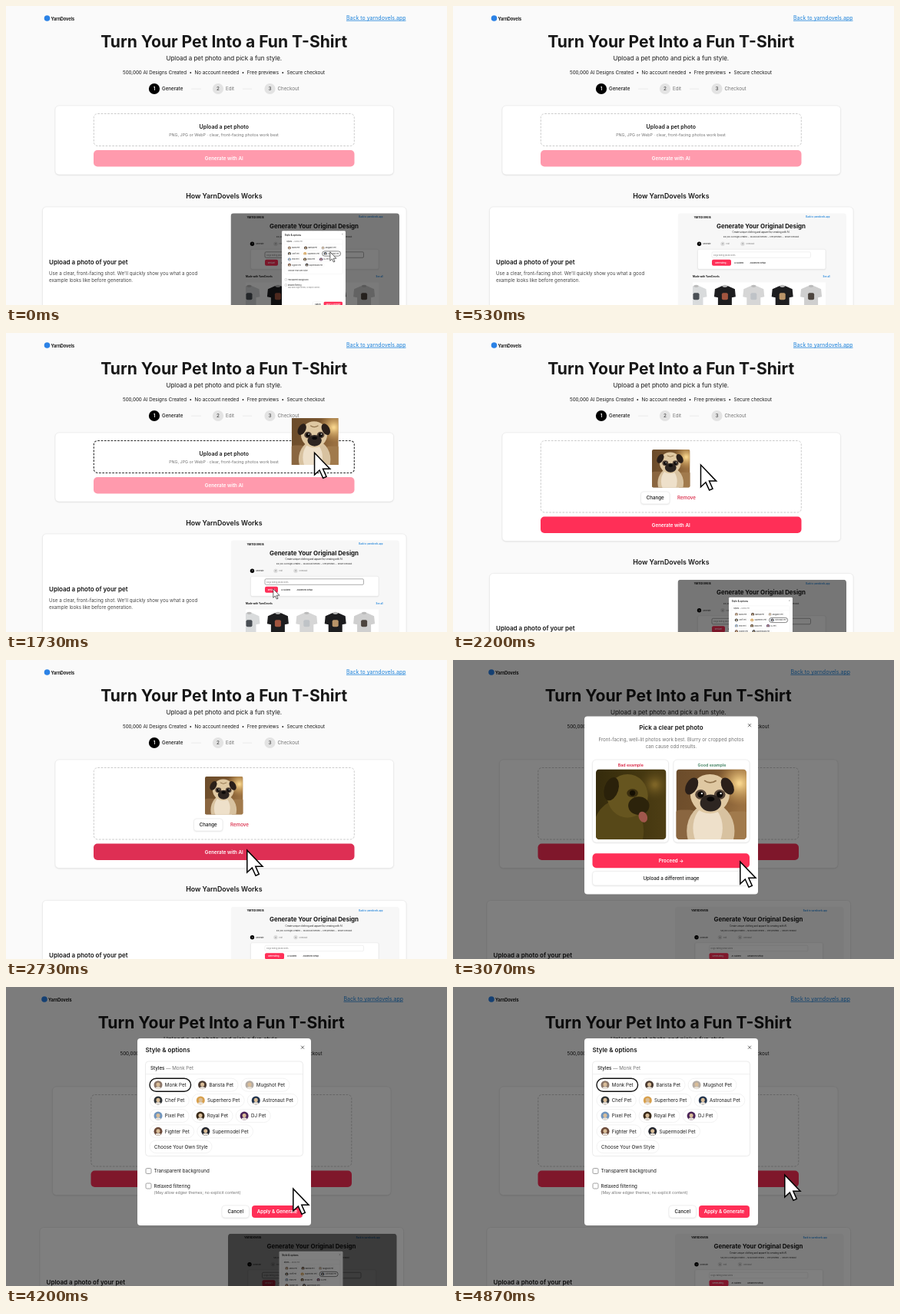
Recreate the animation shown at these times as an HTML page with a canvas. Size 574 by 390 pixels, loop 4.94 s.

```html
<!DOCTYPE html>
<html lang="en">
<head>
<meta charset="utf-8">
<title>Pet T-shirt walkthrough</title>
<style>
  html, body { margin: 0; width: 100%; height: 100%; overflow: hidden; background: #fafafa; }
  canvas { display: block; width: 574px; height: 390px; }
</style>
</head>
<body>
<canvas id="stage"></canvas>
<script>
const W = 574, H = 390, LOOP = 4940;
const DROP = 2050, DIALOG = 2870, PRESS = 3550, OPTIONS = 3850;
const RED = '#ff2f57', HOVER = '#de2f54', INK = '#171717', GRAY = '#737373', LINE = '#e6e6e6', BLUE = '#1c82da';
const BRAND = 'YarnDovels';
const STATS = '500,000 AI Designs Created  •  No account needed  •  Free previews  •  Secure checkout';

const canvas = document.getElementById('stage');
const ctx = canvas.getContext('2d');
const dpr = window.devicePixelRatio || 1;
canvas.width = W * dpr;
canvas.height = H * dpr;

// ---------- helpers ----------

const clamp = v => Math.max(0, Math.min(1, v));

function text(s, x, y, size, { color = INK, weight = 400, align = 'left' } = {}) {
  ctx.font = `${weight} ${size}px Inter, sans-serif`;
  ctx.fillStyle = color;
  ctx.textAlign = align;
  ctx.fillText(s, x, y + size * 0.36);
  return ctx.measureText(s).width;
}
const centered = (s, x, y, size, color, weight) => text(s, x, y, size, { color, weight, align: 'center' });

function box(x, y, w, h, r, fill, stroke, line = 0.8) {
  ctx.beginPath();
  ctx.roundRect(x, y, w, h, r);
  paint(fill, stroke, line);
}

function paint(fill, stroke, line = 0.8) {
  if (fill) { ctx.fillStyle = fill; ctx.fill(); }
  if (stroke) { ctx.strokeStyle = stroke; ctx.lineWidth = line; ctx.stroke(); }
}

function oval(x, y, rx, ry, fill, angle = 0, stroke, line) {
  ctx.beginPath();
  ctx.ellipse(x, y, rx, ry, angle, 0, 7);
  paint(fill, stroke, line);
}

function poly(points, fill, stroke, line) {
  ctx.beginPath();
  points.forEach(([x, y]) => ctx.lineTo(x, y));
  ctx.closePath();
  paint(fill, stroke, line);
}

function dashed(x, y, w, h, r, color, line, dash) {
  ctx.setLineDash(dash);
  box(x, y, w, h, r, null, color, line);
  ctx.setLineDash([]);
}

function card(x, y, w, h, r = 5) {
  ctx.save();
  ctx.shadowColor = 'rgba(0,0,0,.12)';
  ctx.shadowBlur = 2 * dpr;
  ctx.shadowOffsetY = 0.7 * dpr;
  box(x, y, w, h, r, '#fff');
  ctx.restore();
  box(x, y, w, h, r, null, LINE, 0.6);
}

function at(x, y, scale, draw) {
  ctx.save();
  ctx.translate(x, y);
  ctx.scale(scale, scale);
  draw();
  ctx.restore();
}

// Keys are [time, x, y, linear?]; the flag belongs to the stretch ending at that key.
function along(keys, t) {
  const i = keys.findIndex(k => k[0] > t);
  if (i < 0) return keys[keys.length - 1].slice(1, 3);
  if (i === 0) return keys[0].slice(1, 3);
  const [t0, x0, y0] = keys[i - 1], [t1, x1, y1, linear] = keys[i];
  const u = (t - t0) / (t1 - t0), e = linear ? u : u * u * (3 - 2 * u);
  return [x0 + (x1 - x0) * e, y0 + (y1 - y0) * e];
}

function arrow(x, y, scale = 1) {
  at(x, y, scale, () => {
    ctx.lineJoin = 'miter';
    poly([[0.8, 1.2], [0.8, 30], [7.3, 24], [12, 34.2], [16.3, 32.4], [11.8, 22.3], [21, 22.3]], '#fff', '#000', 1.5);
  });
}

// ---------- pictures ----------

function picture(x, y, size, r, draw) {
  at(x, y, size / 100, () => {
    ctx.beginPath();
    ctx.roundRect(0, 0, 100, 100, r);
    ctx.clip();
    draw();
  });
}

function fillGradient(gradient, ...colors) {
  colors.forEach((c, i) => gradient.addColorStop(i / (colors.length - 1), c));
  ctx.fillStyle = gradient;
  ctx.fillRect(0, 0, 100, 100);
}

function pug(x, y, size, r = 0) {
  picture(x, y, size, r, () => {
    fillGradient(ctx.createLinearGradient(0, 0, 100, 30), '#6b4c2b', '#75522d', '#9a7041');
    fillGradient(ctx.createRadialGradient(90, 20, 2, 90, 20, 32), '#f6d48c', 'rgba(200,150,80,0)');
    box(-4, 58, 34, 46, 10, '#8a6640');
    box(70, 60, 36, 46, 10, '#a17a4c');
    oval(49, 88, 34, 40, '#d8c2a0');
    oval(45, 84, 21, 32, '#eee0ca');
    oval(48, 35, 28, 28, '#dfc8a2');
    oval(22, 24, 8, 13, '#2a1f19', 0.5);
    oval(73, 24, 8, 13, '#2a1f19', -0.5);
    oval(35, 36, 8, 7, '#57463a');
    oval(62, 36, 8, 7, '#57463a');
    oval(49, 48, 15, 12, '#2d2521');
    oval(35, 36, 4.6, 4.6, '#0c0908');
    oval(62, 36, 4.6, 4.6, '#0c0908');
    oval(36.5, 34.5, 1.3, 1.3, '#fff');
    oval(63.5, 34.5, 1.3, 1.3, '#fff');
    oval(49, 42.5, 5.5, 3.4, '#0a0808');
    ctx.beginPath();
    ctx.moveTo(40, 16); ctx.quadraticCurveTo(48, 22, 57, 16);
    paint(null, '#93764f', 2);
  });
}

function badPug(x, y, size) {
  picture(x, y, size, 5, () => {
    fillGradient(ctx.createLinearGradient(0, 0, 100, 0), '#352b0c', '#41350f', '#4e3e14');
    fillGradient(ctx.createRadialGradient(84, 22, 2, 84, 22, 24), '#7d6426', 'rgba(78,62,20,0)');
    oval(32, 88, 36, 44, '#574818');
    oval(45, 38, 29, 31, '#66551f');
    oval(22, 28, 10, 17, '#2a210a', 0.3);
    oval(61, 52, 15, 13, '#2c230b');
    oval(52, 34, 8, 6, '#3a2e0f');
    oval(52, 34, 4, 4, '#151003');
    oval(67, 68, 6, 8, '#a0574c', -0.4);
  });
}

function cartoonDog(x, y, fur, floppy) {
  const edge = '#4b2a20';
  at(x, y, 1, () => {
    ctx.lineJoin = 'round';
    for (const side of [-1, 1]) {
      if (floppy) oval(side * 16, 0, 6, 13, '#b98154', -side * 0.3, edge, 1.3);
      else poly([[side * 17, -4], [side * 15, -23], [side * 4, -14]], fur, edge, 1.3);
    }
    oval(0, 20, 15, 14, fur, 0, edge, 1.3);
    oval(0, 0, floppy ? 16 : 18, 16.5, fur, 0, edge, 1.3);
    oval(0, 6, 11, 8.5, '#fff0da');
    for (const side of [-1, 1]) {
      oval(side * 7, -2, 2.2, 2.7, '#2a1713');
      oval(side * 7 + 0.6, -3, 0.7, 0.7, '#fff');
      oval(side * 11, 5, 2.4, 1.5, '#f2a08a');
      oval(side * 8, 16, 4, 3.5, fur, 0, edge, 1);
    }
    oval(0, 3, 2.4, 1.7, '#2a1713');
    oval(0, 9, 4, 2.6, '#a33d35', 0, edge, 0.8);
    oval(0, 15, 6, 3.5, '#8a5030', 0, edge, 1);
  });
}

function shirt(x, y, color, print) {
  at(x, y, 1, () => {
    poly([[-4, 0], [4, 0], [13, 4], [14, 14], [9, 15], [9, 40], [-9, 40], [-9, 15], [-14, 14], [-13, 4]], color);
    oval(0, 0, 3.2, 1.6, '#bbb');
    box(-4, 9, 8, 9, 2, print);
  });
}

// ---------- embedded demo clip ----------

const DEMO_LOOP = 2000;
const demoArrow = [[0, 55, 63], [100, 55, 63], [240, 129, 50], [350, 129, 50], [560, 135, 118], [1900, 80, 110], [DEMO_LOOP, 55, 63]];
const SHIRTS = [['#d9dbdc', '#4a4f55'], ['#1d1d1f', '#a2553f'], ['#d6d6d6', '#bfc3c7'], ['#1d1d1f', '#b99468'], ['#cfcfcf', '#4d453f']];

function demoShirts() {
  text('Made with ' + BRAND, 19.5, 83, 3.2, { weight: 700 });
  text('See all', 198, 83, 2.8, { color: BLUE, weight: 600, align: 'right' });
  ctx.save();
  ctx.beginPath();
  ctx.rect(19.5, 90, 173, 60);
  ctx.clip();
  ctx.fillStyle = '#fff';
  ctx.fillRect(19.5, 90, 173, 60);
  SHIRTS.forEach(([color, print], i) => shirt(24 + i * 37.4, 95, color, print));
  ctx.restore();
}

function demo(x, y, p) {
  const choosing = p >= 100 && p < 620;
  const generating = p >= 620 && p < 1420;
  const results = p >= 1420 && p < 1880;
  at(x, y, 1, () => {
    ctx.beginPath();
    ctx.roundRect(0, 0, 219.5, 150, 4);
    ctx.clip();
    ctx.fillStyle = '#f7f7f7';
    ctx.fillRect(0, 0, 220, 150);
    text(BRAND, 21, 5, 4, { weight: 700 });
    text('Back to yarndovels.app', 198, 5, 2.75, { color: BLUE, weight: 600, align: 'right' });
    centered('Generate Your Original Design', 108.5, 16.5, 7.9, INK, 700);
    centered('Create unique clothing and apparel by creating with AI.', 108.5, 25, 2.9, INK);
    centered(STATS, 108.5, 31, 2.35, INK);
    [['Generate', 28], ['Edit', 58.5], ['Checkout', 84.5]].forEach(([label, cx], i) => {
      oval(cx, 40, 2.7, 2.7, i ? '#ddd' : '#000');
      centered(String(i + 1), cx, 40, 2.4, i ? GRAY : '#fff', 600);
      text(label, cx + 4.5, 40, 2.4, { color: i ? GRAY : INK });
    });
    card(26, 47, 166.5, results ? 110 : 26, 2);
    box(44.5, 50.5, 128.5, 7.5, 1.5, '#fff', results || generating ? LINE : '#777', 0.6);
    text('Dogs eating pizza slices', 46.5, 54.3, 2.5, { color: GRAY });
    const wide = generating ? 25 : 17;
    box(44.5, 60.5, wide, 8, 2, RED);
    centered(generating ? 'Generating…' : 'Restart', 44.5 + wide / 2, 64.5, 2.7, '#fff', 600);
    text('AI Guided', 48.5 + wide, 64.5, 2.6, { weight: 500 });
    text('Advanced Setup', 69 + wide, 64.5, 2.6, { weight: 500 });
    if (results) {
      cartoonDog(55, 103, '#d98a4a');
      cartoonDog(108, 101, '#edc79b', true);
      cartoonDog(161, 103, '#d98a4a');
    } else {
      demoShirts();
    }
    if (choosing) {
      ctx.fillStyle = 'rgba(0,0,0,.52)';
      ctx.fillRect(0, 0, 220, 150);
      at(66.5, 23, 0.367, () => optionsDialog(5, 34));
    }
    if (p < 620 || p > 1940) arrow(...along(demoArrow, p), 0.4);
  });
}

// ---------- page ----------

function page(t) {
  const uploaded = t >= DROP, push = uploaded ? 51.5 : 0;
  const over = !uploaded && t > 1000 && along(arrowPath, t)[0] < 453;
  const hovered = t > 2500 && t < DIALOG;

  oval(53.5, 16, 3.8, 3.8, '#2b82e6');
  text(BRAND, 58.5, 17.3, 5.5, { weight: 700 });
  const linkWidth = text('Back to yarndovels.app', 520.5, 15.7, 7, { color: BLUE, align: 'right' });
  ctx.fillRect(520.5 - linkWidth, 18.7, linkWidth, 0.8);
  centered('Turn Your Pet Into a Fun T-Shirt', 283.8, 46.5, 21.1, INK, 700);
  centered('Upload a pet photo and pick a fun style.', 283.8, 68.5, 8, INK);
  centered(STATS, 283.5, 86.3, 6.22, INK);

  [['Generate', 193], ['Edit', 276], ['Checkout', 343.5]].forEach(([label, x], i) => {
    oval(x, 108, 7.1, 7.1, i ? '#e3e3e3' : '#000');
    centered(String(i + 1), x, 108, 6.22, i ? '#555' : '#fff', 600);
    text(label, x + 10, 108.2, 6.22, { color: i ? GRAY : INK, weight: i ? 400 : 500 });
  });
  ctx.fillStyle = '#e2e2e2';
  ctx.fillRect(241, 107.8, 13, 0.6);
  ctx.fillRect(308, 107.8, 12, 0.6);

  card(64, 130, 440.5, 90 + push);
  dashed(114.3, 140.5, 339, 42 + push, 5, over ? '#2b2b2b' : '#c6c6c6', over ? 1.1 : 0.9, [2.7, 1.6]);
  if (uploaded) {
    pug(259, 152, 49.5, 4);
    card(244.5, 207, 37.5, 16, 3.5);
    centered('Change', 263.2, 215, 6.22, INK, 500);
    centered('Remove', 304, 215, 6.22, '#d92645', 500);
  } else {
    centered('Upload a pet photo', 283.8, 157.5, 7.05, INK, 600);
    centered('PNG, JPG or WebP · clear, front-facing photos work best', 283.5, 168, 5.33, GRAY);
  }
  box(114, 188 + push, 339.5, 21.5, 5, !uploaded ? '#ff9aad' : hovered ? HOVER : RED);
  centered('Generate with AI', 283.8, 198.8 + push, 6.22, '#fff', 600);

  centered(`How ${BRAND} Works`, 283.8, 247.8 + push, 8.8, INK, 600);
  card(47.5, 262 + push, 473.5, 200);
  text('Upload a photo of your pet', 56, 334 + push, 8, { weight: 600 });
  text("Use a clear, front-facing shot. We'll quickly show you what a good", 56, 348.8 + push, 6.2, { color: '#444' });
  text('example looks like before generation.', 56, 357.3 + push, 6.2, { color: '#444' });
  demo(292.5, 270.3 + push, (t + 270) % DEMO_LOOP);
}

// ---------- dialogs, 226 wide, drawn from their own top left ----------

function dialogBase(h) {
  box(0, 0, 226, h, 4, '#fff');
  ctx.beginPath();
  ctx.moveTo(213, 9.7); ctx.lineTo(217, 13.7);
  ctx.moveTo(217, 9.7); ctx.lineTo(213, 13.7);
  paint(null, '#444', 0.8);
}

function photoDialog(pressed) {
  dialogBase(232);
  centered('Pick a clear pet photo', 113, 15, 8, INK, 600);
  centered('Front-facing, well-lit photos work best. Blurry or cropped photos', 113, 30.5, 6.22, GRAY);
  centered('can cause odd results.', 113, 39.5, 6.22, GRAY);
  card(10.5, 56.5, 99, 108);
  card(116, 56.5, 99, 108);
  centered('Bad example', 60.3, 64, 5.33, '#d92645', 600);
  centered('Good example', 166, 64, 5.33, '#3f8060', 600);
  badPug(15, 69, 91.5);
  pug(119.5, 69, 91.5, 5);
  box(10.5, 178.7, 204.5, 19, 5, pressed ? '#e63056' : RED);
  if (pressed) dashed(10.8, 179, 203.9, 18.4, 5, '#b52a48', 0.6, [1.5, 1]);
  centered('Proceed →', 113, 188.5, 6.22, '#fff', 600);
  card(10.5, 202, 204.5, 18.5, 4);
  centered('Upload a different image', 113, 211.5, 6.22, INK, 500);
}

const STYLES = [
  ['Monk Pet', 'Barista Pet', 'Mugshot Pet'],
  ['Chef Pet', 'Superhero Pet', 'Astronaut Pet'],
  ['Pixel Pet', 'Royal Pet', 'DJ Pet'],
  ['Fighter Pet', 'Supermodel Pet'],
];
const AVATARS = ['#8a7568', '#4a3a30', '#b5aca4', '#2f3336', '#d8a04c', '#22344e', '#6f94bd', '#3a2a18', '#4b2458', '#6b4a3a', '#23262e'];

function optionsDialog(selected, extra = 0) {
  dialogBase(244 + extra);
  text('Style & options', 10.5, 15.3, 8, { weight: 600 });
  box(10.5, 30, 205, 123.5, 4, '#fff', LINE);
  const used = text('Styles', 17, 38.5, 6.22, { weight: 500 });
  text(' — Monk Pet', 17 + used, 38.5, 6.22, { color: GRAY });
  ctx.fillStyle = LINE;
  ctx.fillRect(10.5, 46.5, 205, 0.6);

  let index = 0;
  STYLES.forEach((row, r) => {
    let x = 16;
    const y = 60.7 + r * 20.2;
    for (const label of row) {
      const width = text(label, x + 19.8, y, 6.22) + 25.8;
      const chosen = index === selected;
      box(x, y - 8.5, width, 17, 8.5, null, chosen ? '#111' : '#ededed', chosen ? 1.4 : 0.7);
      oval(x + 11, y, 5.5, 5.5, AVATARS[index]);
      oval(x + 11, y - 0.5, 2.5, 2.6, '#d9bd98');
      oval(x + 11, y + 3.8, 3.4, 1.6, '#e8e2da');
      x += width + 4;
      index++;
    }
  });
  box(16, 133, 81, 16.5, 8.2, null, '#ededed', 0.7);
  text('Choose Your Own Style', 22, 141.3, 6.22);

  [['Transparent background', 173], ['Relaxed filtering', 192.5]].forEach(([label, y]) => {
    box(11, y - 3.5, 7, 7, 1.5, '#fff', '#888', 0.8);
    text(label, 21.5, y, 6.22);
  });
  text('(May allow edgier themes; no explicit content)', 21.5, 200.8, 5.2, { color: GRAY });
  card(110, 218 + extra, 35.5, 16, 4);
  centered('Cancel', 127.7, 226 + extra, 6.22, INK, 500);
  box(149, 218 + extra, 66, 16, 4, RED);
  centered('Apply & Generate', 182, 226 + extra, 6.22, '#fff', 600);
}

// ---------- timeline ----------

const arrowPath = [
  [950, 610, 190], [1200, 545, 184, true], [1730, 401, 155, true], [2030, 322, 168, true],
  [2150, 322, 168], [2600, 313, 247], [2830, 313, 247], [3060, 373, 262],
  [4250, 373, 262], [4850, 431, 244],
];
const photoPath = [[950, 583, 141], [1200, 518, 135, true], [1730, 372, 111, true], [2030, 293, 122, true]];

function draw(t) {
  ctx.setTransform(dpr, 0, 0, dpr, 0, 0);
  ctx.fillStyle = '#fafafa';
  ctx.fillRect(0, 0, W, H);
  at(t >= DIALOG ? -3.5 : 0, 0, 1, () => page(t));

  if (t >= 950 && t < DROP) {
    const [x, y] = along(photoPath, t);
    if (t < 1300) box(x - 10.5, y + 0.5, 40, 44, 0, '#fff', '#777', 0.9);
    pug(x, y, 61);
  }
  if (t >= DIALOG) {
    const shown = clamp((t - DIALOG) / 120);
    ctx.fillStyle = `rgba(0,0,0,${0.5 * shown})`;
    ctx.fillRect(0, 0, W, H);
    ctx.globalAlpha = shown;
    if (t < OPTIONS) at(171, 73.5, 1, () => photoDialog(t >= PRESS));
    else at(171, 67, 1, () => optionsDialog(0));
    ctx.globalAlpha = 1;
  }
  if (t >= 950) arrow(...along(arrowPath, t));
}

const start = performance.now();
function tick() {
  draw((performance.now() - start) % LOOP);
  requestAnimationFrame(tick);
}
tick();
</script>
</body>
</html>
```
